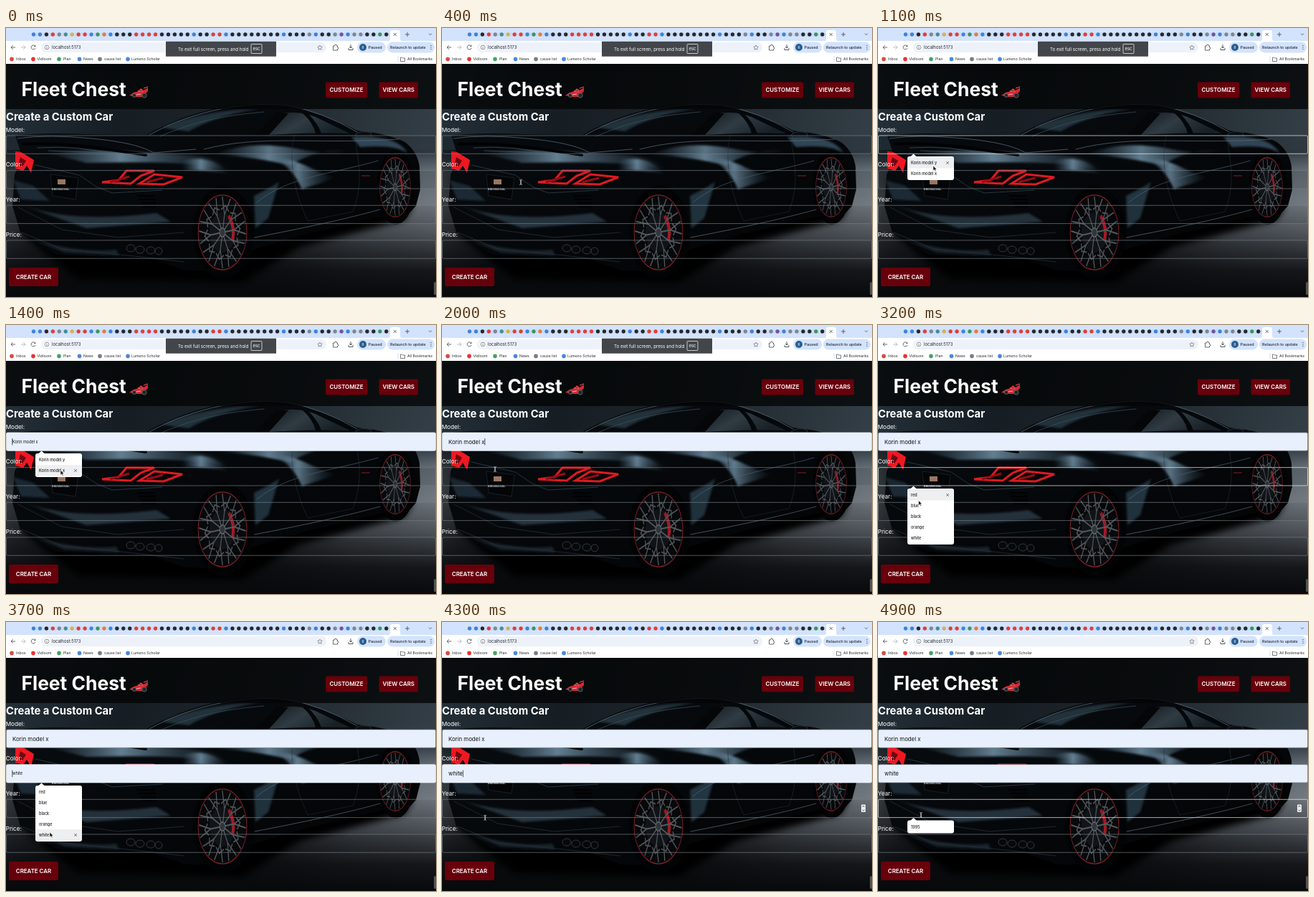
Write an HTML page that moves like this. It is 600x375 px and loops after 5 s.

```html
<!DOCTYPE html>
<html lang="en">
<head>
<meta charset="utf-8">
<title>Create a Custom Car</title>
<style>
html, body { margin: 0; width: 100%; height: 100%; overflow: hidden; background: #000; }
svg { display: block; width: 100%; height: 100%; font-family: Inter, "Open Sans", sans-serif; }
.bar { font-size: 5.4px; fill: #25282c; }
.mark { font-size: 5.2px; }
.label { font-size: 8.2px; fill: #fff; }
.button { font-size: 7.9px; font-weight: 600; fill: #fff; }
.item { font-size: 5.5px; font-weight: 500; fill: #202124; }
</style>
</head>
<body>
<svg id="stage" viewBox="0 0 600 375" preserveAspectRatio="none">
  <defs>
    <linearGradient id="wall" x2="1" y2=".15">
      <stop offset="0" stop-color="#25313a"/><stop offset=".3" stop-color="#161d23"/>
      <stop offset=".65" stop-color="#20282e"/><stop offset="1" stop-color="#323d45"/>
    </linearGradient>
    <linearGradient id="floor" x2="0" y2="1">
      <stop offset="0" stop-color="#2f3941"/><stop offset=".13" stop-color="#606a72"/><stop offset=".38" stop-color="#747b82"/>
      <stop offset=".6" stop-color="#484d53"/><stop offset=".82" stop-color="#15171a"/><stop offset="1" stop-color="#08090b"/>
    </linearGradient>
    <linearGradient id="shade">
      <stop offset="0" stop-color="#07090b" stop-opacity=".55"/><stop offset=".12" stop-color="#07090b" stop-opacity=".9"/>
      <stop offset=".55" stop-color="#07090b" stop-opacity=".82"/><stop offset=".8" stop-color="#07090b" stop-opacity=".25"/>
      <stop offset="1" stop-color="#07090b" stop-opacity="0"/>
    </linearGradient>
    <linearGradient id="paint" x2="1" y2="1">
      <stop offset="0" stop-color="#090d11"/><stop offset=".5" stop-color="#05080b"/><stop offset="1" stop-color="#020304"/>
    </linearGradient>
    <linearGradient id="sheen">
      <stop offset="0" stop-color="#4c6b80" stop-opacity="0"/><stop offset=".4" stop-color="#7292a7" stop-opacity=".85"/>
      <stop offset="1" stop-color="#2a4150" stop-opacity="0"/>
    </linearGradient>
    <linearGradient id="glass" x2="1" y2=".4">
      <stop offset="0" stop-color="#0b1014"/><stop offset=".55" stop-color="#303b43"/><stop offset="1" stop-color="#172026"/>
    </linearGradient>
    <filter id="soft" x="-30%" y="-30%" width="160%" height="160%"><feGaussianBlur stdDeviation="5"/></filter>
    <filter id="haze" x="-30%" y="-30%" width="160%" height="160%"><feGaussianBlur stdDeviation="1.7"/></filter>
  </defs>

  <!-- backdrop -->
  <rect y="50" width="600" height="325" fill="url(#wall)"/>
  <path d="M0 170H600V375H0Z" fill="url(#floor)"/>
  <path d="M0 170H600V375H0Z" fill="url(#shade)"/>
  <path d="M20 285 250 300 525 253 568 248 556 268 410 306 330 355 100 350Z" fill="#020304" filter="url(#soft)"/>

  <!-- car -->
  <path d="M13 150Q55 145 110 148L196 149C235 126 288 109 338 106L384 106Q434 115 490 143Q538 148 558 160 574 173 577 193L578 225 572 248 564 257 522 263 420 287 345 309 300 338 250 338 205 322 70 316 20 285 9 248 12 204 23 181Z" fill="url(#paint)"/>
  <path d="M350 150Q365 133 381 120 412 113 440 128L480 147Q420 145 350 150Z" fill="url(#glass)"/>
  <path d="M378 118 394 119 367 149 345 152Z" fill="#040608"/>
  <path d="M419 117Q435 132 440 147L432 147Q429 132 412 117Z" fill="#05080a"/>
  <path d="M487 149Q494 142 509 146L511 156 493 158Z" fill="#080c10" stroke="#3c4a53" stroke-width=".6"/>
  <g filter="url(#haze)">
    <path d="M291 176Q338 156 405 168T480 168Q422 172 397 192 352 180 291 176Z" fill="url(#sheen)"/>
    <path d="M371 180C416 183 434 205 461 207 446 216 430 218 413 225Q401 195 371 180Z" fill="url(#sheen)"/>
    <path d="M482 152Q545 148 560 174 542 162 494 166Z" fill="#344c5c"/>
    <path d="M55 174C115 166 180 174 257 177 285 178 302 186 319 202 276 184 181 187 112 188Z" fill="url(#sheen)"/>
    <path d="M246 184Q293 176 311 205 279 196 246 199Z" fill="url(#sheen)"/>
    <path d="M218 139Q272 115 355 112 292 122 255 144Z" fill="#24323b"/>
    <path d="M346 234Q373 221 381 214L366 265 348 279Z" fill="#23343f"/>
    <path d="M20 246Q91 273 210 258L230 270 112 279Z" fill="#263640"/>
    <path d="M10 212 38 220 61 241 21 239Z" fill="#1c2b35"/>
    <path d="M40 296Q105 314 154 309L158 317 82 313Z" fill="#1c262d"/>
  </g>
  <g fill="none" stroke-linecap="round">
    <path d="M16 154Q57 148 120 154T206 174L265 169" stroke="#4d6472" stroke-width=".9"/>
    <path d="M24 162C78 158 142 169 195 177" stroke="#010203" stroke-width="4"/>
    <path d="M44 167Q100 163 154 177M59 171 135 174" stroke="#597080" stroke-width=".6"/>
    <path d="M200 149C266 113 337 102 392 108Q440 116 490 145" stroke="#637984" stroke-width=".7"/>
    <path d="M215 151C270 127 316 121 360 117" stroke="#40535f" stroke-width=".7"/>
    <path d="M276 169C358 148 426 163 548 155" stroke="#607a8a" stroke-width=".7"/>
    <path d="M350 243C394 207 453 204 519 185" stroke="#567081" stroke-width=".6"/>
    <path d="M347 292C410 280 476 266 522 253" stroke="#65727a" stroke-width=".7"/>
    <path d="M402 149C394 188 402 228 421 269L484 256Q500 216 488 163" stroke="#22313a" stroke-width=".6"/>
    <path d="M17 250 78 281 156 292 248 285 M22 285 78 308 170 317 248 326" stroke="#2a3740" stroke-width=".7"/>
    <path d="M41 191 102 205 126 221 148 230 218 226" stroke="#344955" stroke-width=".7"/>
    <path d="M184 234h23M186 239h22M189 244h20M192 249h17" stroke="#010203" stroke-width="2.5"/>
  </g>
  <path d="M13 172 21 173 39 184 35 202 29 192 24 199 13 196Z" fill="#ef1822"/>
  <path d="M20 180 28 185 23 193 17 192Z" fill="#6c0911"/>
  <path d="M130 216 154 209 164 197 212 196 258 206 244 210 222 221 180 220Z" fill="#080405"/>
  <path d="M134 215 157 212 168 199 207 199 188 206 174 217Z M186 217 207 204 246 208 220 218Z" fill="none" stroke="#ef1d26" stroke-width="3"/>
  <path d="M145 215 172 207 M196 215 219 209" fill="none" stroke="#a60b17" stroke-width="3"/>
  <path d="M62 204 101 209 97 239 65 234Z" fill="#030507" stroke="#26323a" stroke-width=".6"/>
  <rect x="72" y="211" width="11" height="7" fill="#a78069"/>
  <text x="64" y="225.5" font-size="4" font-weight="600" fill="#d4d8dc">BRENNOVAL</text>
  <path d="M496 206h12" stroke="#9b1c29"/>
  <g fill="#07090b" stroke="#56616a" stroke-width=".6">
    <ellipse cx="174" cy="307" rx="6" ry="5"/><ellipse cx="187" cy="309" rx="6" ry="5"/>
    <ellipse cx="202" cy="310" rx="6" ry="5"/><ellipse cx="213" cy="311" rx="5" ry="5"/>
  </g>
  <g id="wheels"></g>

  <!-- page -->
  <rect y="50" width="600" height="63" fill="#030405" opacity=".78"/>
  <text x="21.5" y="95" font-size="26.4" font-weight="700" fill="#fff">Fleet Chest</text>
  <g>
    <path d="M172 94 178 90 185 88 188 84 192 87 198 83 198 88 195 91 196 96 181 96Z" fill="#d92732"/>
    <path d="M184 88 189 86 191 89ZM192 84 198 82" fill="#252b31" stroke="#ef5b61"/>
    <path d="M176 94 188 92" stroke="#f3d9da" stroke-width=".8"/>
    <g fill="#20252a" stroke="#697078" stroke-width=".8"><circle cx="179" cy="94" r="2.6"/><circle cx="193" cy="94" r="3.2"/></g>
  </g>
  <text x="0" y="129" font-size="14.8" font-weight="700" fill="#fff">Create a Custom Car</text>
  <g id="form"></g>
  <g id="buttons"></g>
  <rect x="597" y="354" width="3" height="18" rx="1.5" fill="#505356"/>

  <!-- browser -->
  <rect width="600" height="18" fill="#d3e3fd"/>
  <rect y="18" width="600" height="32" fill="#fff"/>
  <path d="M534 18Q536 18 536 14V6Q536 3 539 3H547Q550 3 550 6V14Q550 18 552 18Z" fill="#fff"/>
  <g id="tabs"></g>
  <g fill="none" stroke="#41464c" stroke-width=".8">
    <path d="m540.7 7 4 4m0-4-4 4M557 9h6m-3-3v6M590 7.7l2 2 2-2"/>
    <path d="M13 27H7m2.7-2.8L7 27l2.7 2.8"/><path d="M21 27h6m-2.7-2.8L27 27l-2.7 2.8" stroke="#a9adb2"/>
    <path d="M40.5 25A3 3 0 1 0 41 28M41 23.7v2h-2"/>
  </g>
  <rect x="49" y="20" width="398" height="14" rx="7" fill="#edf2fa"/>
  <circle cx="57" cy="27" r="4.8" fill="#fff"/>
  <path d="M57 26.3v2.6M57 24.6v.8" stroke="#4b5055" stroke-width=".7"/>
  <circle cx="57" cy="27" r="3" fill="none" stroke="#4b5055" stroke-width=".6"/>
  <text x="64" y="29" font-size="6" fill="#25282c">localhost:5173</text>
  <path d="m438 24 1 2 2.3.3-1.7 1.6.4 2.3-2-1.1-2 1.1.4-2.3-1.7-1.6 2.3-.3Z" fill="none" stroke="#555a60" stroke-width=".6"/>
  <path d="M456.5 25h2q0-2 1.5-2t1.5 2h1v2q1.5 0 1.5 1.2t-1.5 1.2V31h-6Z" fill="none" stroke="#41464c" stroke-width=".8"/>
  <path d="M481 23v5m-2-2 2 2 2-2M478 28v2.5h6V28" fill="none" stroke="#41464c" stroke-width=".9"/>
  <rect x="490" y="19.5" width="40" height="15" rx="7.5" fill="#d3e3fd"/>
  <circle cx="498" cy="27" r="5" fill="#285e91"/>
  <text x="498" y="28.7" font-size="4.5" fill="#fff" text-anchor="middle">R</text>
  <text class="bar" x="505.5" y="29" font-weight="500">Paused</text>
  <rect x="532" y="19.5" width="66" height="15" rx="7.5" fill="#d3e3fd"/>
  <text class="bar" x="536" y="29" font-weight="500">Relaunch to update</text>
  <path d="M593 24v1m0 1.5v1m0 1.5v1" stroke="#25282c"/>
  <g id="bookmarks"></g>
  <path d="M547 39v9" stroke="#c5d5ee" stroke-width=".7"/>
  <path d="M550.5 41h2l1 1h3v4.5h-6Z" fill="none" stroke="#41464c" stroke-width=".7"/>
  <text class="bar mark" x="560" y="45.3">All Bookmarks</text>

  <g id="notice">
    <rect x="223" y="18.7" width="154" height="21" fill="#3c4043" opacity=".96"/>
    <text x="240" y="31.5" font-size="6.2" fill="#fff">To exit full screen, press and hold</text>
    <rect x="342" y="22.5" width="15" height="13" rx="1" fill="none" stroke="#fff" stroke-width=".7"/>
    <text x="349.5" y="31.2" font-size="6" fill="#fff" text-anchor="middle">esc</text>
  </g>
  <g id="popups"></g>
  <path id="arrow" d="M0 0V7L1.7 5.5 2.8 8 4 7.5 2.9 5.1H5Z" fill="#111" stroke="#fff" stroke-width=".6"/>
  <path id="beam" d="M-1.8-3.5Q0-3.5 0-2V2Q0 3.5-1.8 3.5M1.8-3.5Q0-3.5 0-2V2Q0 3.5 1.8 3.5" fill="none" stroke="#d8dcdf" stroke-width=".8"/>
</svg>
<script>
const LOOP = 5000, STEP = 100;
const $ = id => document.getElementById(id);

function add(parent, tag, attrs, text) {
  const node = document.createElementNS("http://www.w3.org/2000/svg", tag);
  for (const key in attrs) node.setAttribute(key, attrs[key]);
  if (text) node.textContent = text;
  parent.append(node);
  return node;
}
const show = (node, on) => node.setAttribute("visibility", on ? "visible" : "hidden");
const place = (node, x, y) => node.setAttribute("transform", `translate(${x} ${y})`);

function wheel(x, y, rx, ry) {
  const g = add($("wheels"), "g", { transform: `translate(${x} ${y}) scale(${rx} ${ry})` });
  add(g, "circle", { cx: .04, r: 1.16, fill: "#020304" });
  add(g, "circle", { r: .93, fill: "#07090b", stroke: "#87202a", "stroke-width": .025 });
  add(g, "circle", { r: .5, fill: "#111519" });
  add(g, "path", { d: "M.28-.45Q.55-.15.44.2L.34.18Q.42-.1.2-.38Z", fill: "#a51925" });
  for (let i = 0; i < 10; i++)
    add(g, "path", {
      d: "M0-.1V-.45L-.16-.88M0-.45.16-.88M-.15-.55 0-.68.15-.55",
      fill: "none", stroke: "#555a5f", "stroke-width": .035, transform: `rotate(${i * 36 + 10})`
    });
  add(g, "circle", { r: .11, fill: "#30363b", stroke: "#686e73", "stroke-width": .025 });
}
wheel(302, 285, 36.5, 56);
wheel(543, 222, 23, 44.5);

const tabColors = {
  b: "#3e83dc", k: "#24292f", r: "#dd4037", g: "#39965a", y: "#d1b34e",
  o: "#e37c3d", t: "#468b9a", p: "#70539f", s: "#7c8792"
};
[..."bbkrstyrrbgobkkkrrrrkkkkkbkkrrbkkkkkkkkbkkksbkkspbsskkgk"].forEach((c, i) => {
  const x = 38.5 + i * 8.95;
  add($("tabs"), "circle", { cx: x, cy: 9, r: 2.7, fill: tabColors[c] });
  add($("tabs"), "path", { d: `M${x + 4.5} 6v6`, stroke: "#aabfdf", "stroke-width": .4 });
});

[["Inbox", 8, 14, "#d94a3d"], ["Vidloom", 38, 43.5, "#ed3030"], ["Plan", 74, 80, "#45a361"],
 ["News", 102.5, 108, "#4b88d9"], ["cause list", 131, 137, "#777d84"], ["Lumeno Scholar", 170, 175, "#4a85de"]
].forEach(([name, icon, x, fill]) => {
  add($("bookmarks"), "circle", { cx: icon, cy: 43.4, r: 2.8, fill });
  add($("bookmarks"), "text", { class: "bar mark", x, y: 45.3 }, name);
});

[["CUSTOMIZE", 446, 75.5, 58, 22], ["VIEW CARS", 520.5, 75.5, 54.5, 22], ["CREATE CAR", 4, 334, 69, 26]
].forEach(([name, x, y, width, height]) => {
  add($("buttons"), "rect", { x, y, width, height, rx: 2, fill: "#68000b" });
  add($("buttons"), "text", { class: "button", x: x + width / 2, y: y + height / 2 + 2.8, "text-anchor": "middle" }, name);
});

const fields = ["Model:", "Color:", "Year:", "Price:"].map((name, i) => {
  const y = 150 + i * 48.65, form = $("form");
  add(form, "text", { class: "label", x: -.3, y: y - 5.4 }, name);
  return {
    y,
    box: add(form, "rect", { x: .4, y, width: 599.2, height: 25.3, rx: 2, "stroke-width": .7 }),
    text: add(form, "text", { x: 9, y: y + 15.5, fill: "#111" }),
    caret: add(form, "path", { stroke: "#111", "stroke-width": .7 })
  };
});
const spinner = add($("form"), "g", {});
add(spinner, "rect", { x: 585, y: 254.5, width: 6, height: 10.5, rx: 1, fill: "#eee" });
add(spinner, "path", { d: "m586.5 258 1.5-2 1.5 2m-3 3.5 1.5 2 1.5-2", fill: "none", stroke: "#444", "stroke-width": .7 });

function popup(y, names) {
  const g = add($("popups"), "g", {}), height = names.length * 15 + 3;
  add(g, "path", { d: `M45 ${y + .5} 49.5 ${y - 3.5} 54 ${y + .5}Z`, fill: "#fff" });
  add(g, "rect", { x: 41, y, width: 65, height, rx: 3, fill: "#fff" });
  const hover = add(g, "g", {});
  add(hover, "rect", { x: 41, y: 1, width: 65, height: 15.5, rx: 2, fill: "#eeeff1" });
  add(hover, "path", { d: "m95.2 7 3.8 3.8m0-3.8-3.8 3.8", stroke: "#444", "stroke-width": .7 });
  names.forEach((name, i) => add(g, "text", { class: "item", x: 46, y: y + 11.2 + i * 15 }, name));
  return { g, hover, y, names };
}
const models = popup(179, ["Korin model y", "Korin model x"]);
const colors = popup(228, ["red", "blue", "black", "orange", "white"]);
const years = popup(276.5, ["1995"]);

// time, x, y of the pointer
const path = [
  [0, 110, 225], [400, 110, 215], [700, 72, 166], [900, 72, 166], [1100, 77, 192], [1300, 76, 202],
  [1600, 76, 203], [2000, 74, 201], [2300, 69, 205], [2600, 69, 205], [3000, 58, 229],
  [3200, 56.5, 244.5], [3700, 61, 293], [4000, 61, 293], [4400, 60, 269], [5000, 60, 269]
];
function pointer(t) {
  const i = path.findIndex(p => p[0] > t);
  const [t0, x0, y0] = path[i - 1], [t1, x1, y1] = path[i];
  const u = (t - t0) / (t1 - t0), e = u * u * (3 - 2 * u);
  return [x0 + (x1 - x0) * e, y0 + (y1 - y0) * e];
}

function updatePopup(p, open, row) {
  show(p.g, open);
  show(p.hover, open && row >= 0);
  if (row >= 0) place(p.hover, 0, p.y + row * 15);
}

function updateField(f, value, preview, focused, caret) {
  f.box.setAttribute("fill", value ? "#e8f0fe" : "rgba(0,0,0,.08)");
  f.box.setAttribute("stroke", focused ? "#edf1f4" : "#737b82");
  f.text.textContent = value;
  f.text.setAttribute("font-size", preview ? 5.5 : 7.8);
  f.text.setAttribute("y", f.y + (preview ? 14.8 : 15.5));
  show(f.caret, caret);
  if (caret) {
    const x = value && !preview ? 9.4 + f.text.getComputedTextLength() : 8.8;
    f.caret.setAttribute("d", `M${x} ${f.y + 8}v9.5`);
  }
}

function draw(t) {
  const [x, y] = pointer(t);
  const modelOpen = t >= 800 && t < 1600, colorOpen = t >= 2400 && t < 4000, yearOpen = t >= 4500;
  const modelRow = !modelOpen || t < 1000 ? -1 : t < 1300 ? 0 : 1;
  const colorRow = !colorOpen || t < 3000 ? -1
    : t < 3300 ? 0 : Math.min(4, Math.floor((y - colors.y) / 15));
  const model = t >= 1300 ? models.names[1] : "";
  const color = t >= 4000 ? "white" : t >= 3300 && colorRow >= 0 ? colors.names[colorRow] : "";

  updatePopup(models, modelOpen, modelRow);
  updatePopup(colors, colorOpen, colorRow);
  updatePopup(years, yearOpen, -1);
  updateField(fields[0], model, t < 1600, t >= 700 && t < 2300, t >= 1300 && t < 2300);
  updateField(fields[1], color, t < 4000, t >= 2300 && t < 4400, t >= 3300 && t < 4400);
  updateField(fields[2], "", false, t >= 4400, false);
  updateField(fields[3], "", false, false, false);
  show(spinner, t >= 4300);

  $("notice").setAttribute("opacity", t < 2500 ? 1 : t < 2600 ? .42 : 0);
  const isArrow = modelRow >= 0 || colorRow >= 0 || (t >= 4000 && t < 4300);
  show($("arrow"), isArrow);
  show($("beam"), t >= 400 && !isArrow);
  place($("arrow"), x, y);
  place($("beam"), x, y);
}

function frame(now) {
  draw(Math.floor(now % LOOP / STEP) * STEP);
  requestAnimationFrame(frame);
}
draw(0);
requestAnimationFrame(frame);
</script>
</body>
</html>
```
